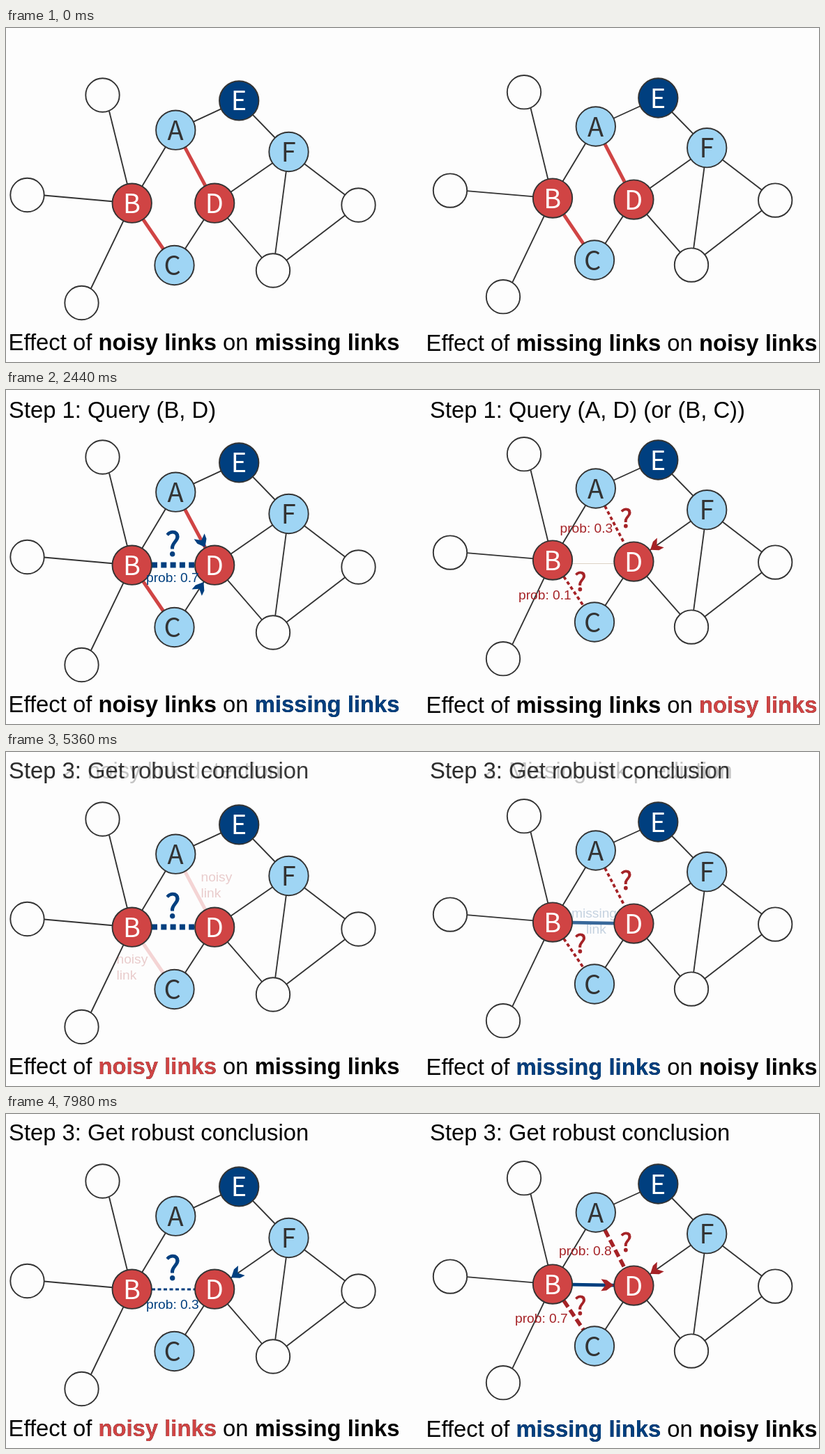
Write an HTML page with a canvas that moves like this. It is 1166 by 480 pixels and loops after 8 s.

```html
<!DOCTYPE html>
<html lang="en">
<head>
<meta charset="utf-8">
<title>Noisy and missing links</title>
<style>
html, body { margin: 0; width: 100%; height: 100%; overflow: hidden; background: #fdfdfd; }
canvas { display: block; }
</style>
</head>
<body>
<canvas id="stage" width="1166" height="480"></canvas>
<script>
const ctx = document.getElementById('stage').getContext('2d');
const LOOP = 8000, FADE = 400;
const INK = '#333', RED = '#d04444', NAVY = '#003f7f', SKY = '#9fd5f4', BROWN = '#a52226', WHITE = '#fdfdfd';
const SANS = '"Liberation Sans", Arial, sans-serif';
const LETTERS = '"Noto Sans CJK JP", "Noto Sans CJK SC", "Noto Sans", sans-serif';

// Start times of the three steps and their details
const STEP1 = 150, STEP2 = 3090, STEP3 = 5050;
const LABELS = 3550, WEAK = 1950, FINAL = 7480;

const left = {
  A: [243.3, 146.7], B: [180.7, 251.7], C: [241.5, 341], D: [299.2, 251.7], E: [334.2, 104.4], F: [405.5, 178],
  u: [138.5, 96.5], v: [30.5, 240], w: [108.5, 395], x: [505.5, 254.5], y: [383, 348.5]
};
const right = {
  A: [845.8, 141.5], B: [784, 244.6], C: [844, 333.5], D: [900.4, 246.6], E: [935.3, 100.5], F: [1005.2, 172.2],
  u: [743, 92.2], v: [637, 233.6], w: [713, 386.2], x: [1103.2, 247.6], y: [983, 340.6]
};
const EDGES = 'uB vB wB AB AE EF FD Fx Fy xy Dy CD'.split(' ');
const FILLS = { A: SKY, B: RED, C: SKY, D: RED, E: NAVY, F: SKY };
// Where the edges of the outer left nodes meet their rims
const PORTS = { u: [9.5, 23], v: [24, 0.5], w: [13.5, -21] };

const clamp = v => Math.max(0, Math.min(1, v));

// Opacity of a part that fades in at `from` and out at `to`
const shown = (t, from, to = Infinity) =>
  Math.min(clamp((t - from) / FADE), 1 - clamp((t - to) / FADE));

function withAlpha(alpha, draw) {
  if (alpha <= 0) return;
  ctx.save();
  ctx.globalAlpha = alpha;
  draw();
  ctx.restore();
}

function line([x1, y1], [x2, y2], color, width, dash = []) {
  ctx.strokeStyle = color;
  ctx.lineWidth = width;
  ctx.setLineDash(dash);
  ctx.beginPath();
  ctx.moveTo(x1, y1);
  ctx.lineTo(x2, y2);
  ctx.stroke();
  ctx.setLineDash([]);
}

function along([x1, y1], [x2, y2], dist) {
  const k = dist / Math.hypot(x2 - x1, y2 - y1);
  return [x1 + (x2 - x1) * k, y1 + (y2 - y1) * k];
}

function edges(g) {
  for (const [a, b] of EDGES) {
    const [dx, dy] = PORTS[a] || [0, 0];
    line([g[a][0] + dx, g[a][1] + dy], g[b], INK, 1.9);
  }
}

// A link between the rims of two nodes
function link(g, pair, color, width, dash) {
  const [a, b] = [g[pair[0]], g[pair[1]]];
  line(along(a, b, 28.5), along(b, a, 28), color, width, dash);
}

function text(str, x, y, size, color = '#000', weight = 'normal') {
  ctx.font = `${weight} ${size}px ${SANS}`;
  ctx.fillStyle = color;
  ctx.textAlign = 'left';
  ctx.fillText(str, x, y);
  return x + ctx.measureText(str).width;
}

function question(x, y, size, color) {
  ctx.font = `${size}px ${LETTERS}`;
  ctx.textAlign = 'center';
  ctx.fillStyle = ctx.strokeStyle = color;
  ctx.lineWidth = size / 40;
  ctx.fillText('?', x, y);
  ctx.strokeText('?', x, y);
}

function nodes(g) {
  for (const [name, [x, y]] of Object.entries(g)) {
    const fill = FILLS[name];
    ctx.beginPath();
    ctx.arc(x, y, fill ? 28.2 : 24.2, 0, 7);
    ctx.fillStyle = fill || WHITE;
    ctx.fill();
    ctx.strokeStyle = INK;
    ctx.lineWidth = 1.9;
    ctx.stroke();
    if (!fill) continue;
    ctx.font = `38px ${LETTERS}`;
    ctx.textAlign = 'center';
    ctx.fillStyle = fill === SKY ? INK : '#fff';
    ctx.fillText(name, x - (name === 'C' ? 3 : 0.3), y + 14);
  }
}

// An arrowhead that travels from node to node in 500 ms, then rests
function arrow(t, g, pair, color, start, end, fade = FADE) {
  if (t < start || t >= end + fade) return;
  const a = g[pair[0]], b = g[pair[1]];
  const dx = b[0] - a[0], dy = b[1] - a[1];
  const p = clamp((t - start) / 500);
  const [x, y] = along(a, b, 32 + (Math.hypot(dx, dy) - 70) * p);
  withAlpha(fade ? 1 - clamp((t - end) / fade) : 1, () => {
    ctx.translate(x, y);
    ctx.rotate(Math.atan2(dy, dx));
    ctx.fillStyle = color;
    ctx.beginPath();
    [[-9, -8.5], [-1, -7.5], [9, 0], [-1, 7.5], [-9, 8.5], [-2.5, 0]].forEach(q => ctx.lineTo(...q));
    ctx.fill();
  });
}

function caption(t, x, y, first, second, firstColor, secondColor) {
  const size = 32.8;
  const x1 = text('Effect of ', x, y, size);
  const x2 = text(first, x1, y, size, '#000', 'bold');
  const x3 = text(' on ', x2, y, size);
  text(second, x3, y, size, '#000', 'bold');
  withAlpha(shown(t, STEP1, STEP2), () => text(second, x3, y, size, secondColor, 'bold'));
  withAlpha(shown(t, STEP2), () => text(first, x1, y, size, firstColor, 'bold'));
}

function titles(t, x, one, two, three) {
  const put = (str, y, from, to) =>
    withAlpha(shown(t, from, to), () => text(str, x, y, 32.8));
  put('Step 1: ' + one, 39.5, STEP1, STEP2);
  put('Step 2: ' + two, 38, STEP2, STEP3);
  put('Step 3: ' + three, 38, STEP3);
}

function note(t, str, x, y, color, from, to) {
  withAlpha(shown(t, from, to), () => text(str, x, y, 19.2, color));
}

function drawLeft(t) {
  const g = left;
  edges(g);
  withAlpha(1 - shown(t, STEP3), () => {
    line(g.A, g.D, RED, 5);
    line(g.B, g.C, RED, 5);
  });
  withAlpha(shown(t, STEP1, FINAL), () => line([209, 251.5], [271, 251.5], NAVY, 8, [8, 5.3]));
  withAlpha(shown(t, FINAL), () => line([209, 252], [271, 252], NAVY, 3, [5, 3.5]));
  nodes(g);
  withAlpha(shown(t, STEP1), () => question(239.5, 237.5, 47, NAVY));
  arrow(t, g, 'AD', NAVY, 840, STEP2);
  arrow(t, g, 'CD', NAVY, 840, STEP2);
  arrow(t, g, 'EF', NAVY, 6400, 6950, 0);
  arrow(t, g, 'FD', NAVY, 6950, LOOP);
  note(t, 'prob: 0.7', 201, 276, NAVY, WEAK, STEP2);
  note(t, 'prob: 0.3', 201, 279.5, NAVY, FINAL);
  [[279.5, 185.5], [158.5, 303.5]].forEach(([x, y]) => {
    note(t, 'noisy', x, y, BROWN, LABELS, STEP3);
    note(t, 'link', x, y + 23, BROWN, LABELS, STEP3);
  });
  titles(t, 4, 'Query (B, D)', 'noisy link detection', 'Get robust conclusion');
  caption(t, 3.6, 463.3, 'noisy links', 'missing links', RED, NAVY);
}

function drawRight(t) {
  const g = right;
  edges(g);
  for (const pair of ['AD', 'BC']) {
    withAlpha(1 - shown(t, STEP1), () => link(g, pair, RED, 5));
    withAlpha(shown(t, STEP1, FINAL), () => link(g, pair, BROWN, 3.7, [5, 3.7]));
    withAlpha(shown(t, FINAL), () => link(g, pair, BROWN, 5.5, [11, 5]));
  }
  withAlpha(shown(t, STEP1, STEP2), () => line([811, 249.5], [873, 249.5], '#ddd3c6', 1));
  withAlpha(shown(t, STEP3), () => line(g.B, g.D, NAVY, 4.6));
  nodes(g);
  withAlpha(shown(t, STEP1), () => {
    question(889.5, 198, 36.5, BROWN);
    question(824, 289, 36.5, BROWN);
  });
  arrow(t, g, 'EF', BROWN, 840, 1400, 0);
  arrow(t, g, 'FD', BROWN, 1400, STEP2);
  arrow(t, g, 'EF', BROWN, 5840, 6400, 0);
  arrow(t, g, 'FD', BROWN, 6400, LOOP);
  arrow(t, g, 'BD', BROWN, 5840, LOOP);
  note(t, 'prob: 0.3', 794.5, 204.5, BROWN, WEAK, STEP2);
  note(t, 'prob: 0.1', 735, 301, BROWN, WEAK, STEP2);
  note(t, 'prob: 0.8', 793, 203, BROWN, FINAL);
  note(t, 'prob: 0.7', 730, 300, BROWN, FINAL);
  note(t, 'missing', 811, 237.5, NAVY, LABELS, STEP3);
  note(t, 'link', 832, 260.5, NAVY, LABELS, STEP3);
  titles(t, 608, 'Query (A, D) (or (B, C))', 'Missing link prediction', 'Get robust conclusion');
  caption(t, 602.6, 464, 'missing links', 'noisy links', NAVY, RED);
}

function frame() {
  const t = performance.now() % LOOP;
  ctx.fillStyle = WHITE;
  ctx.fillRect(0, 0, 1166, 480);
  drawLeft(t);
  drawRight(t);
  requestAnimationFrame(frame);
}
frame();
</script>
</body>
</html>
```
